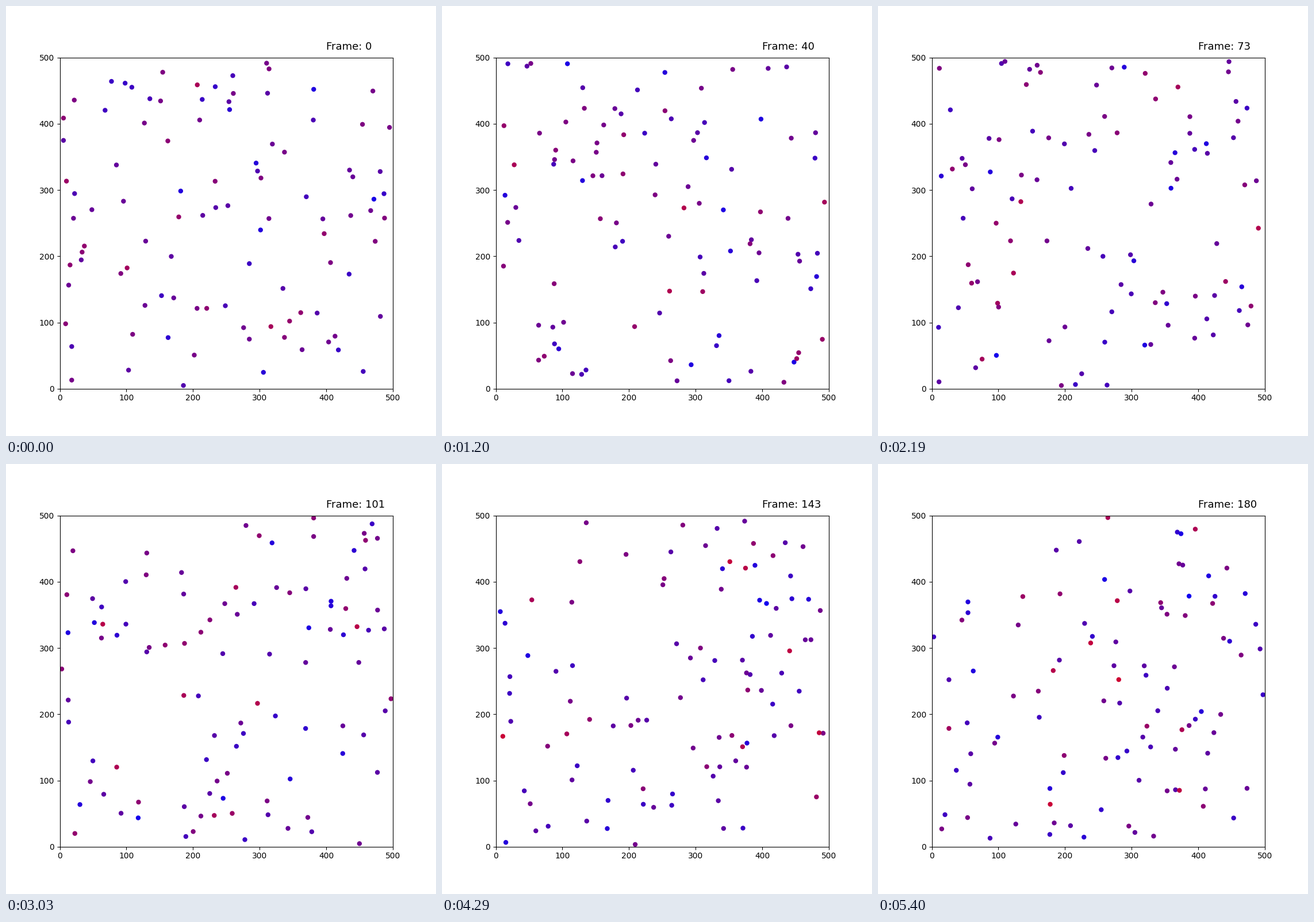
Animation of 748 by 748 pixels, one loop 5.43 s. Source, as a matplotlib script:

```python
import numpy as np
import matplotlib.pyplot as plt
from matplotlib.animation import FuncAnimation

SIZE = 500       # box side
RADIUS = 3       # particle radius
COUNT = 100
FRAMES = 181
TOP_SPEED = 10   # speed shown as pure red

rng = np.random.default_rng(7)


def bounce_walls(pos, vel):
    low, high = pos < RADIUS, pos > SIZE - RADIUS
    vel[low] = np.abs(vel[low])
    vel[high] = -np.abs(vel[high])
    np.clip(pos, RADIUS, SIZE - RADIUS, out=pos)


def collide(pos, vel):
    """Elastic collisions between equal masses."""
    gap = pos[:, None] - pos[None]
    near = np.triu(np.hypot(gap[..., 0], gap[..., 1]) < 2 * RADIUS, 1)
    for i, j in np.argwhere(near):
        d = pos[i] - pos[j]
        dist = np.hypot(*d) + 1e-9
        normal = d / dist
        closing = (vel[i] - vel[j]) @ normal
        if closing < 0:
            vel[i] -= closing * normal
            vel[j] += closing * normal
        push = max(0, 2 * RADIUS - dist) / 2 * normal
        pos[i] += push
        pos[j] -= push


def simulate():
    pos = rng.uniform(RADIUS, SIZE - RADIUS, (COUNT, 2))
    vel = rng.uniform(-TOP_SPEED / 2, TOP_SPEED / 2, (COUNT, 2))
    states = []
    for _ in range(FRAMES):
        states.append((pos.copy(), np.hypot(*vel.T)))
        pos += vel
        collide(pos, vel)
        bounce_walls(pos, vel)
    return states


def speed_colors(speed):
    share = np.clip(speed / TOP_SPEED, 0, 1)
    return np.column_stack([share, np.zeros_like(share), 1 - share])


states = simulate()

fig, ax = plt.subplots(figsize=(7.48, 7.48), dpi=100)
ax.set_xlim(0, SIZE)
ax.set_ylim(0, SIZE)
dots = ax.scatter(*states[0][0].T, s=25, c=speed_colors(states[0][1]))
label = ax.text(400, 512, "Frame: 0", fontsize=13)


def update(i):
    pos, speed = states[i]
    dots.set_offsets(pos)
    dots.set_color(speed_colors(speed))
    label.set_text(f"Frame: {i}")
    return dots, label


anim = FuncAnimation(fig, update, frames=FRAMES, interval=30,
                     repeat=True, repeat_delay=0)
plt.show()
```
